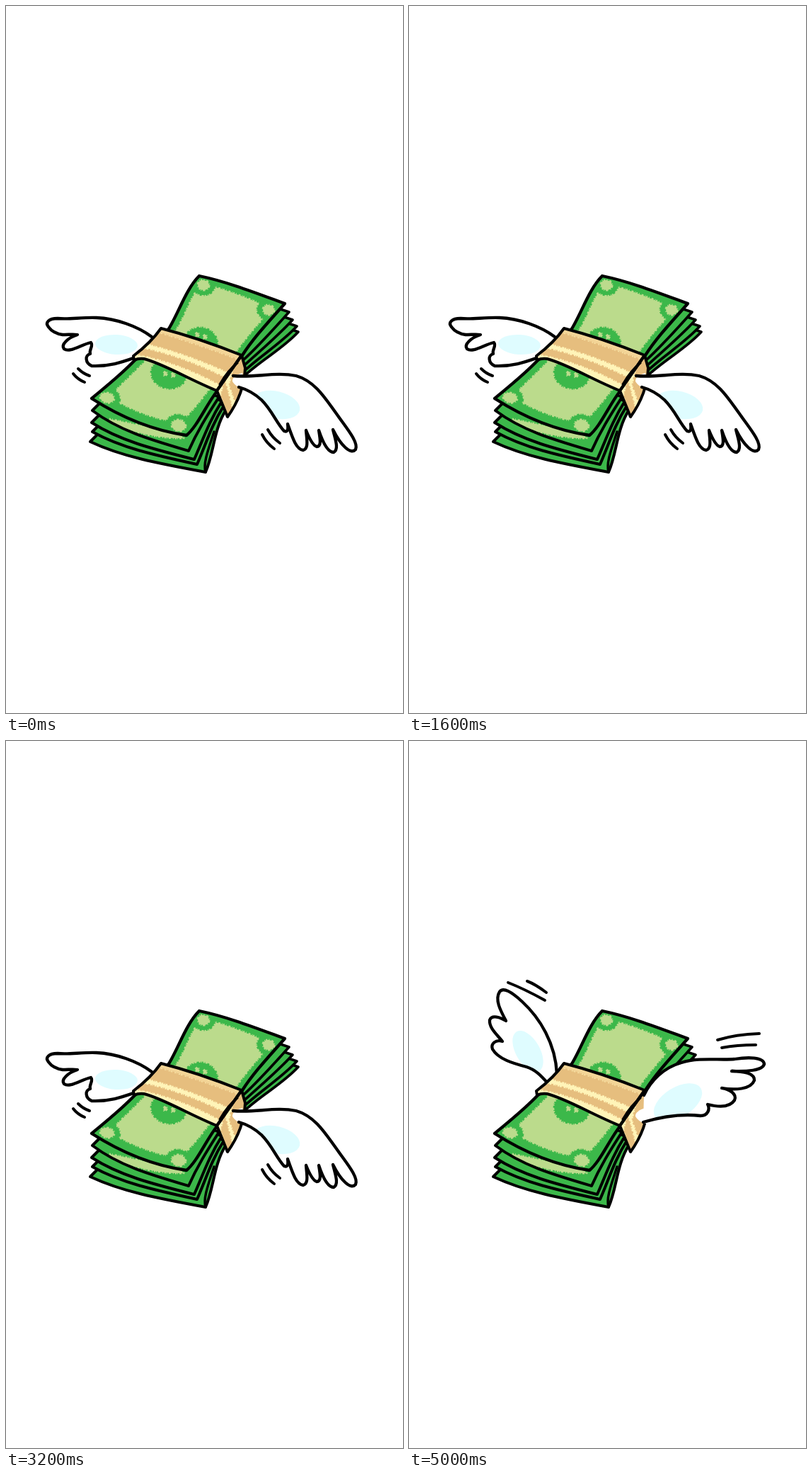
Animation, 561 px wide and 998 px high, one loop 5100 ms. Source, as an HTML page with a canvas:

```html
<!DOCTYPE html>
<html lang="en">
<head>
<meta charset="utf-8">
<title>Flying cash</title>
<style>
html, body { margin: 0; width: 100%; height: 100%; overflow: hidden; background: #fff; }
canvas { display: block; }
</style>
</head>
<body>
<canvas id="stage" width="561" height="998"></canvas>
<script>
const ctx = document.getElementById('stage').getContext('2d');
const INK = '#000', GREEN = '#3cb84a', LIGHT = '#bbdb8c';
const TAN = '#e6be7e', PALE = '#f3d597', CREAM = '#fff4b8', ICE = '#dffcff';
const LOOP = 5100, TICK = 50, FLAP = 160;

ctx.lineCap = ctx.lineJoin = 'round';

function fill(d, color) {
  ctx.fillStyle = color;
  ctx.fill(new Path2D(d));
}

function line(d, width = 4.2, color = INK) {
  ctx.strokeStyle = color;
  ctx.lineWidth = width;
  ctx.stroke(new Path2D(d));
}

function shape(d, color, width) {
  fill(d, color);
  line(d, width);
}

// Fill with a grainy, crayon-like edge.
function crayon(path, color) {
  ctx.fillStyle = ctx.strokeStyle = color;
  ctx.fill(path);
  ctx.save();
  ctx.lineCap = 'butt';
  ctx.lineWidth = 3;
  ctx.setLineDash([2, 2, 1, 3, 3, 2, 1, 1]);
  ctx.stroke(path);
  ctx.restore();
}

function oval(x, y, rx, ry, turn = 0) {
  const p = new Path2D();
  p.ellipse(x, y, rx, ry, turn, 0, Math.PI * 2);
  return p;
}

function clipped(d, paint) {
  ctx.save();
  ctx.clip(new Path2D(d));
  paint();
  ctx.restore();
}

const TOP_BILL = 'M273 381 C312 389 353 405 394 420 C371 446 350 468 334 493 ' +
  'C318 516 310 529 298 544 C283 563 270 594 255 606 ' +
  'C206 599 160 579 121 554 C145 534 163 520 182 500 C204 481 221 471 231 454 C245 430 255 399 273 381 Z';

// Lower-left corner, bottom right corner, and where the right edge meets the band.
const SHEETS = [
  [119, 615, 282, 658, 311, 570],
  [122, 601, 270, 647, 308, 564],
  [121, 588, 266, 640, 305, 558],
  [122, 571, 258, 628, 301, 552]
];

function sheet([x, y, rx, ry, bx, by]) {
  const w = rx - x, h = ry - y;
  return `M${x + 10} ${y - 10} L${x} ${y} C${x + w * .28} ${y + h * .5} ${x + w * .6} ${y + h * .72} ${rx} ${ry} ` +
    `C${rx + 12} ${ry - 27} ${bx - 18} ${by + 28} ${bx} ${by} L250 530 Z`;
}

function drawLowerBills() {
  // far edges above the band
  const edges = [[413, 460, 338, 521], [411, 452, 338, 514], [405, 443, 337, 507], [400, 432, 335, 500]];
  for (const [x, y, bx, by] of edges) {
    shape(`M${x - 12} ${y - 4} L${x} ${y} C${x - 21} ${y + 23} ${bx + 24} ${by - 22} ${bx} ${by} L322 488 L386 428 Z`, GREEN, 3.7);
  }
  SHEETS.forEach((s, i) => {
    const d = sheet(s);
    fill(d, GREEN);
    if (i === 3) {
      clipped(d, () => crayon(new Path2D('M146 583 C170 588 210 596 242 602 L251 610 C216 611 174 601 148 588 Z'), LIGHT));
    }
    line(d, 4);
  });
  line('M282 658 C278 645 287 623 294 601', 3.5);
}

function drawTopBill() {
  fill(TOP_BILL, GREEN);
  clipped(TOP_BILL, () => {
    crayon(new Path2D('M278 392 C310 400 345 413 376 428 C353 451 338 470 322 492 ' +
      'C300 522 275 562 246 588 C210 584 177 570 146 552 C163 534 180 519 196 502 C220 483 239 463 248 444 C258 425 263 406 278 392 Z'), LIGHT);
    const corners = [[279, 394, 9, 8], [371, 429, 9, 8], [143, 553, 11, 8], [244, 592, 11, 9]];
    for (const [x, y, rx, ry] of corners) {
      crayon(oval(x, y, rx + 7, ry + 6, .2), GREEN);
      crayon(oval(x, y, rx - 1, ry - 1, .2), LIGHT);
    }
    crayon(oval(275, 476, 24, 22, .2), GREEN);
    crayon(oval(230, 519, 25, 21, .2), GREEN);
    for (const [x, y] of [[270, 464], [281, 467], [225, 519], [236, 521]]) {
      crayon(oval(x, y, 2.2, 3, .4), LIGHT);
    }
  });
  line(TOP_BILL, 4.3);
}

// Strip across the front of the band, between two depths from 0 to 1.
function stripe(a, b) {
  const row = v => [219 - 39 * v, 455 + 43 * v, 274 - 37 * v, 473 + 34 * v, 333 - 35 * v, 493 + 49 * v];
  const p = row(a), q = row(b);
  return new Path2D(`M${p[0]} ${p[1]} Q${p[2]} ${p[3]} ${p[4]} ${p[5]} L${q[4]} ${q[5]} Q${q[2]} ${q[3]} ${q[0]} ${q[1]} Z`);
}

function drawBand() {
  const front = 'M219 455 C258 465 298 479 333 493 L298 543 C260 528 223 505 195 498 Q187 497 181 500 L180 494 Q205 475 219 455 Z';
  const side = 'M333 493 L338 511 C337 538 326 562 313 580 L298 543 Z';
  fill(front, CREAM);
  clipped(front, () => {
    crayon(stripe(0, .13), PALE);
    crayon(stripe(.14, .5), TAN);
    crayon(stripe(.66, .85), TAN);
  });
  fill(side, CREAM);
  clipped(side, () => {
    crayon(new Path2D('M333 493 L341 510 L337 545 L326 563 L316 535 L321 514 Z'), TAN);
    crayon(new Path2D('M309 529 L320 570 L313 580 L304 550 Z'), TAN);
  });
  line(front, 4);
  line(side, 4);
  line('M327 504 C317 511 309 522 302 534', 3);
}

const DOWN = {
  left: 'M206 467 C186 452 155 441 128 440 C108 439 88 443 73 441 C60 441 55 447 60 453 C65 460 73 463 80 464 ' +
    'C88 464 95 463 101 464 C88 468 77 478 82 484 C90 490 106 478 120 475 C124 480 117 485 119 491 ' +
    'C111 493 112 504 121 508 C146 509 163 503 183 496',
  right: 'M321 522 C352 525 381 516 410 522 C438 530 453 557 468 577 C479 593 499 616 494 626 ' +
    'C487 634 473 620 462 598 C465 611 471 626 463 630 C454 630 447 614 442 599 C444 611 446 622 439 622 ' +
    'C433 620 428 609 424 599 C425 612 428 625 420 627 C410 626 405 610 398 590 C399 598 398 602 393 600 ' +
    'C382 588 376 571 361 556 C351 547 340 541 329 538',
  ice: [[156, 478, 30, 14, .06], [382, 563, 34, 19, .24]],
  marks: ['M102 512 Q109 519 118 522', 'M95 519 Q101 527 111 531',
    'M370 598 Q376 609 387 617', 'M362 605 Q368 617 379 625']
};

const UP = {
  left: 'M209 470 C207 427 185 391 160 368 C145 354 133 347 128 354 C121 365 129 380 137 395 ' +
    'C129 390 117 386 114 394 C113 405 124 414 132 424 C123 421 115 427 118 435 C126 449 147 455 166 460 C179 464 187 473 196 483',
  right: 'M332 500 C342 479 360 461 385 454 C410 446 438 451 460 449 C479 446 501 446 502 456 ' +
    'C500 465 477 467 456 466 C472 466 489 469 488 479 C483 492 461 493 442 490 C452 491 464 498 460 507 ' +
    'C453 518 438 517 422 513 C426 520 422 529 412 529 C386 526 358 530 331 538',
  ice: [[168, 438, 32, 17, 1.05], [380, 510, 38, 21, -.55]],
  marks: ['M140 341 Q163 350 192 366', 'M167 339 Q178 343 194 355',
    'M436 422 Q462 414 495 413', 'M442 433 Q463 429 490 429']
};

function drawWing(d, ice) {
  fill(d, '#fff');
  clipped(d, () => {
    ctx.fillStyle = ICE;
    ctx.fill(oval(...ice));
  });
  line(d, 4.3);
}

function draw(pose) {
  ctx.fillStyle = '#fff';
  ctx.fillRect(0, 0, 561, 998);
  drawWing(pose.left, pose.ice[0]);
  drawLowerBills();
  drawTopBill();
  drawBand();
  // soft root of the near wing
  fill('M334 518 C326 520 319 525 320 530 C323 535 328 539 336 540 Z', '#fff');
  drawWing(pose.right, pose.ice[1]);
  pose.marks.forEach(m => line(m, 4));
}

let shown = null;
const start = performance.now();

function frame(now) {
  const t = Math.max(0, now - start) % LOOP;
  const tick = Math.floor(t / TICK) * TICK;
  const pose = Math.floor(tick / FLAP) % 2 ? UP : DOWN;
  if (pose !== shown) {
    draw(pose);
    shown = pose;
  }
  requestAnimationFrame(frame);
}
frame(start);
</script>
</body>
</html>
```
